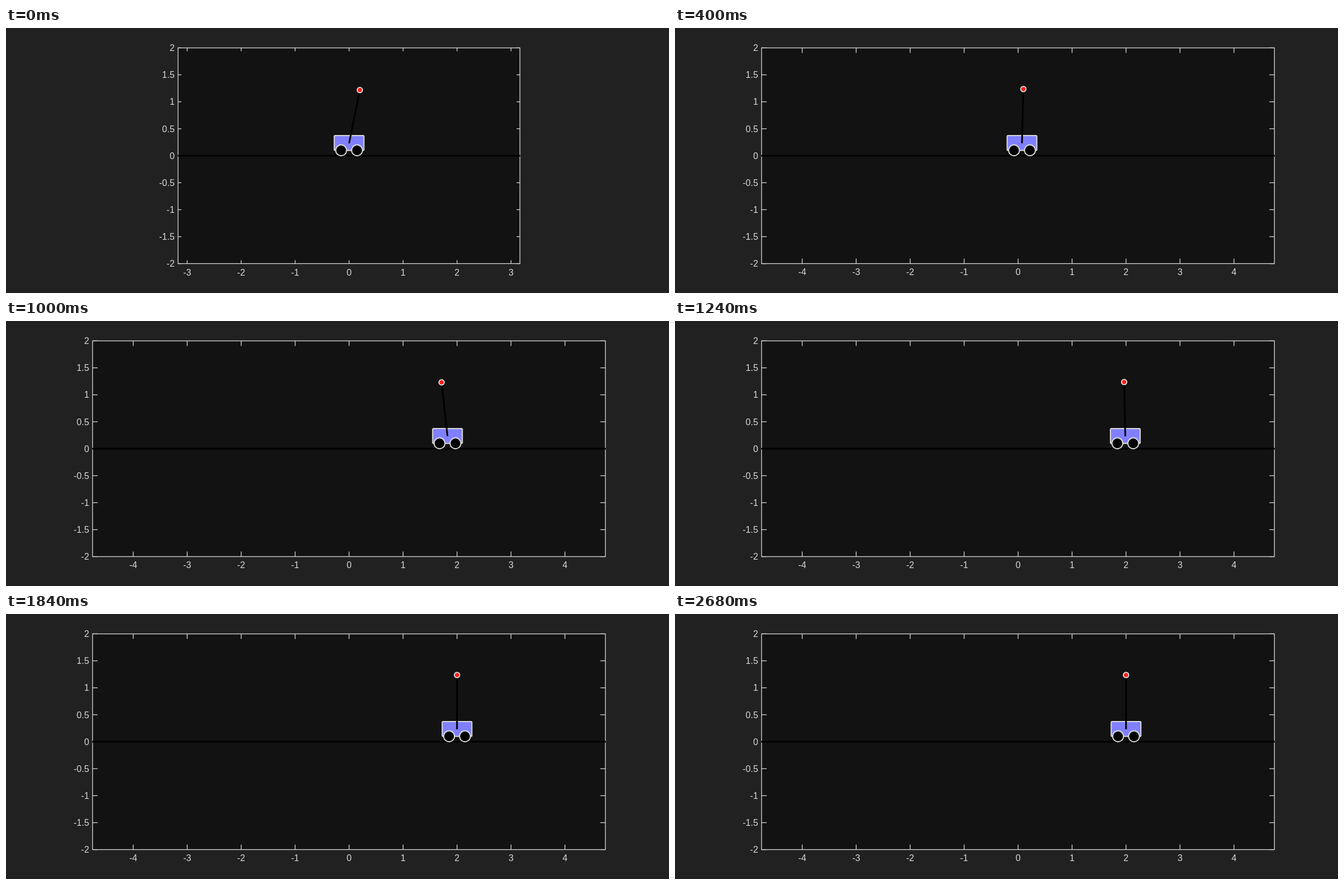
Write an HTML page with a canvas that moves like this. It is 1183x473 px and loops after 2720 ms.

```html
<!DOCTYPE html>
<html lang="en">
<head>
<meta charset="utf-8">
<title>Cart and pendulum</title>
<style>
  html, body { margin: 0; width: 100%; height: 100%; overflow: hidden; background: #212121; }
  canvas { display: block; }
</style>
</head>
<body>
<canvas id="stage" width="1183" height="473"></canvas>
<script>
const ctx = document.getElementById('stage').getContext('2d');
const LOOP = 2720, STEP = 40;
const DT = 0.15;            // simulated seconds per step
const G = 9.81;
const UNIT = 96.3;
const LIGHT = '#d9d9d9';
const NARROW = { left: 307, right: 917, tick: 6, maxX: 3, labelY: 442 };
const WIDE = { left: 154.5, right: 1069.5, tick: 9, maxX: 4, labelY: 441 };
const TOP = 35.5, BOTTOM = 420.5;

const px = x => 612.2 + x * UNIT;
const py = y => 228 - y * 96.3;

// Recovery from an initial lean, with a fourfold pole.
function recover(t) {
  const rate = 3.68, u = rate * t, k = rate * rate / G;
  const a = 0.2, b = a;
  const c = (a / k + 2 * b - a) / 2;
  const d = (6 * c - 3 * b + a) / 6;
  const p = a + b * u + c * u * u + d * u ** 3;
  const dp = b + 2 * c * u + 3 * d * u * u;
  const ddp = 2 * c + 6 * d * u;
  const e = Math.exp(-u);
  return { y: p * e, lean: k * (ddp - 2 * dp + p) * e };
}

// Move to x = 2 with the same kind of damping.
function travel(t) {
  if (t <= 0) return { y: 0, lean: 0 };
  const rate = 3.53, u = rate * t, e = Math.exp(-u);
  const half = u * u / 2, sixth = u ** 3 / 6;
  return {
    y: 2 * (1 - e * (1 + u + half + sixth)),
    lean: 2 * rate * rate / G * (half - sixth) * e
  };
}

function pose(t) {
  const r = recover(t), m = travel(t - 2.025);
  const lean = r.lean + m.lean;
  return { x: r.y + m.y - lean, lean };
}

function line(x1, y1, x2, y2) {
  ctx.beginPath();
  ctx.moveTo(x1, y1);
  ctx.lineTo(x2, y2);
  ctx.stroke();
}

function disc(x, y, r, fill) {
  ctx.beginPath();
  ctx.arc(x, y, r, 0, 2 * Math.PI);
  ctx.fillStyle = fill;
  ctx.fill();
  ctx.stroke();
}

function drawAxes({ left, right, tick, maxX, labelY }) {
  ctx.fillStyle = '#121212';
  ctx.fillRect(left, TOP, right - left, BOTTOM - TOP);
  ctx.strokeStyle = ctx.fillStyle = LIGHT;
  ctx.lineWidth = 1.3;
  ctx.strokeRect(left, TOP, right - left, BOTTOM - TOP);
  ctx.font = '16px "Liberation Sans", Arial, sans-serif';

  ctx.textAlign = 'center';
  for (let v = -maxX; v <= maxX; v++) {
    const x = px(v);
    line(x, TOP, x, TOP + tick);
    line(x, BOTTOM, x, BOTTOM - tick);
    ctx.fillText(v, x, labelY);
  }
  ctx.textAlign = 'right';
  for (let v = -2; v <= 2; v += 0.5) {
    const y = py(v);
    line(left, y, left + tick, y);
    line(right, y, right - tick, y);
    ctx.fillText(v, left - 6.2, y + 5.7);
  }

  ctx.strokeStyle = '#000';
  ctx.lineWidth = 3;
  line(left - 0.5, 228, right + 0.5, 228);
}

function drawCart({ x, lean }) {
  const cx = px(x), pivotY = 205.2;
  ctx.strokeStyle = LIGHT;
  ctx.lineWidth = 2;
  ctx.fillStyle = '#8080ff';
  ctx.beginPath();
  ctx.roundRect(cx - 26.5, 192, 53, 26.5, 1.5);
  ctx.fill();
  ctx.stroke();
  for (const side of [-14.2, 14.2]) disc(cx + side, 218.3, 9.7, '#000');

  const bobX = cx + UNIT * Math.sin(lean);
  const bobY = pivotY - UNIT * Math.cos(lean);
  ctx.strokeStyle = '#000';
  ctx.lineWidth = 3;
  line(cx, pivotY + 0.5, bobX, bobY);
  ctx.strokeStyle = LIGHT;
  ctx.lineWidth = 2;
  disc(bobX, bobY, 4.7, '#ff1a1a');
}

function draw(time) {
  const step = Math.floor(time % LOOP / STEP);
  ctx.fillStyle = '#212121';
  ctx.fillRect(0, 0, 1183, 473);
  drawAxes(step === 0 ? NARROW : WIDE);
  drawCart(pose(step * DT));
}

const start = performance.now();
function tick() {
  draw(performance.now() - start);
  requestAnimationFrame(tick);
}
tick();
</script>
</body>
</html>
```
